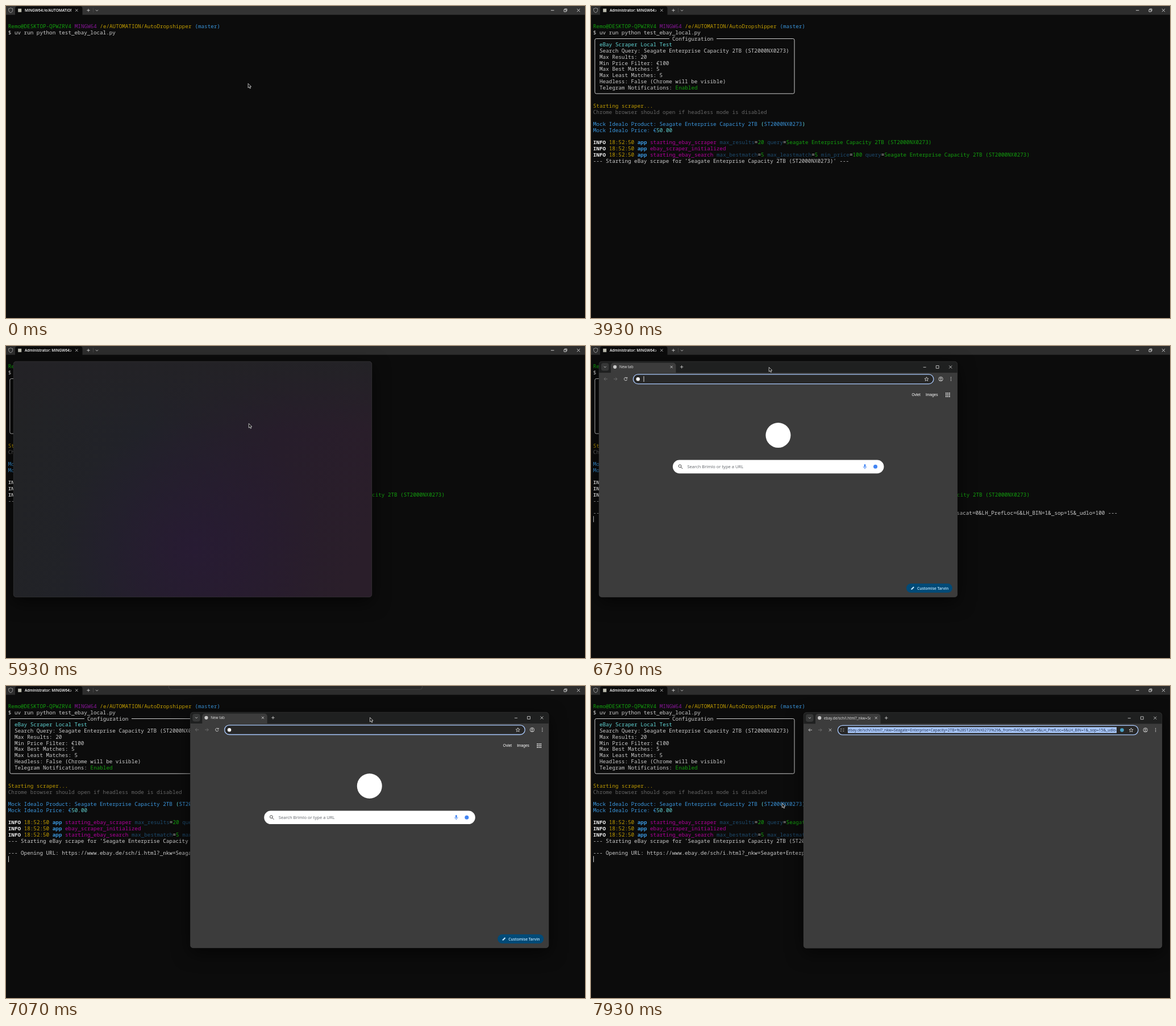
Animation of 1019x549 px, one loop 8 s. Source, as an HTML page with a canvas:

```html
<!DOCTYPE html>
<html lang="en">
<head>
<meta charset="utf-8">
<title>Terminal session</title>
<style>
html, body { margin: 0; width: 100%; height: 100%; overflow: hidden; background: #0c0c0c; }
canvas { display: block; }
</style>
</head>
<body>
<canvas id="stage" width="1019" height="549"></canvas>
<script>
const ctx = document.getElementById('stage').getContext('2d');
const LOOP = 8000, COL = 5.57, ROW = 10.75, LEFT = 3.8;
const UI = '"Open Sans", "Noto Sans", sans-serif';
const MONO = '"Noto Sans Mono", "DejaVu Sans Mono", monospace';

const C = {
  green: '#13a10e', purple: '#881798', pink: '#b4009e', yellow: '#c19c00', blue: '#3a96dd',
  cyan: '#61d6d6', white: '#cccccc', bright: '#f2f2f2', gray: '#666666', dim: '#1d4b6e'
};
const DISK = 'Seagate Enterprise Capacity 2TB (ST2000NX0273)';
const URL_TEXT = 'ebay.de/sch/i.html?_nkw=Seagate+Enterprise+Capacity+2TB+%28ST2000NX0273%29' +
  '&_from=R40&_sacat=0&LH_PrefLoc=6&LH_BIN=1&_sop=15&_udlo=100';

// Drawing helpers
function stroke(d, color, width = 0.8) {
  ctx.strokeStyle = color;
  ctx.lineWidth = width;
  ctx.stroke(new Path2D(d));
}
function fill(d, color) {
  ctx.fillStyle = color;
  ctx.fill(new Path2D(d));
}
function box(x, y, w, h, r, color, border, width = 0.8) {
  ctx.beginPath();
  ctx.roundRect(x, y, w, h, r);
  if (color) { ctx.fillStyle = color; ctx.fill(); }
  if (border) { ctx.strokeStyle = border; ctx.lineWidth = width; ctx.stroke(); }
}
function dot(x, y, r, color) {
  box(x - r, y - r, 2 * r, 2 * r, r, color);
}
function label(text, x, y, size, color, weight = 400, family = UI) {
  ctx.font = `${weight} ${size}px ${family}`;
  ctx.fillStyle = color;
  ctx.fillText(text, x, y);
}
function clipped(x, y, w, h, r, draw) {
  ctx.save();
  ctx.beginPath();
  ctx.roundRect(x, y, w, h, r);
  ctx.clip();
  draw();
  ctx.restore();
}
const cross = (x, y, r, color) =>
  stroke(`M${x - r} ${y - r}l${2 * r} ${2 * r}m0 ${-2 * r}l${-2 * r} ${2 * r}`, color);
const plus = (x, y, r, color) =>
  stroke(`M${x - r} ${y}h${2 * r}M${x} ${y - r}v${2 * r}`, color);
const chevron = (x, y, color) => stroke(`M${x - 2} ${y - 1}l2 2 2-2`, color);

const clamp = (v) => Math.max(0, Math.min(1, v));
const easeOut = (u) => 1 - (1 - clamp(u)) ** 3;
function track(t, keys) {
  let i = 1;
  while (i < keys.length - 1 && t > keys[i][0]) i++;
  const [a, b] = [keys[i - 1], keys[i]];
  const u = clamp((t - a[0]) / (b[0] - a[0]));
  return [a[1] + (b[1] - a[1]) * u, a[2] + (b[2] - a[2]) * u];
}

// Terminal text: runs are "colour text" pairs, a trailing ! on the colour means bold
function line(row, col, ...runs) {
  for (let i = 0; i < runs.length; i += 2) {
    const bold = runs[i].endsWith('!');
    label(runs[i + 1], LEFT + col * COL, 39.2 + row * ROW, COL / 0.6,
      C[runs[i].replace('!', '')], bold ? 700 : 500, MONO);
    col += runs[i + 1].length;
  }
}
function log(row, event, ...pairs) {
  const runs = ['bright!', 'INFO ', 'yellow', '18:52:50 ', 'blue!', 'app ', 'pink', event + ' '];
  for (let i = 0; i < pairs.length; i += 2)
    runs.push('dim', pairs[i], 'white', '=', 'green', pairs[i + 1] + ' ');
  line(row, 0, ...runs);
}

function titleBar(t) {
  ctx.fillStyle = t < 1800 ? '#333333' : '#2d2d2d';
  ctx.fillRect(0, 0, 1019, 15.5);
  box(16, 0.5, 118.5, 18, 4, '#0c0c0c');
  stroke('M8.2 3.4q1.7 1.2 3.5 1.2v3q0 2.8-3.5 4.2-3.5-1.4-3.5-4.2v-3q1.8 0 3.5-1.2z', '#aaa');
  box(21.2, 4.7, 6, 6, 0, '#bdbdb0');
  clipped(32, 0, 83, 15, 0, () =>
    label(t < 3070 ? 'MINGW64:/e/AUTOMATION/AutoDropshipper' : 'Administrator: MINGW64:/e/AUTOMATION',
      33, 10.1, 6.5, '#fff', 600));
  cross(124.3, 7.6, 2.2, '#ddd');
  plus(145, 7.6, 2.7, '#ddd');
  stroke('M153.5 3.5v8', '#4a4a4a');
  chevron(160, 7.8, '#ddd');
  stroke('M959 7.7h5.5', '#eee');
  stroke('M982 6.2h3.8v3.8h-3.8zM983.3 6v-1h3.8v3.8h-1', '#eee');
  cross(1007.5, 7.6, 2.6, '#eee');
}

function terminal(t) {
  line(0, 0, 'green', 'Remo@DESKTOP-QPWZRV4 ', 'purple', 'MINGW64 ',
    'yellow', '/e/AUTOMATION/AutoDropshipper ', 'blue', '(master)');
  line(1, 0, 'white', '$ uv run python test_ebay_local.py');
  if (t >= 2870) {
    stroke('M138 57.5H9.3q-2.5 0-2.5 2.5v91.7q0 2.5 2.5 2.5H355.5q2.5 0 2.5-2.5V60q0-2.5-2.5-2.5H221',
      C.white, 1);
    line(2, 25, 'white', 'Configuration');
    line(3, 2, 'cyan', 'eBay Scraper Local Test');
    ['Search Query: ' + DISK, 'Max Results: 20', 'Min Price Filter: €100', 'Max Best Matches: 5',
      'Max Least Matches: 5', 'Headless: False (Chrome will be visible)'
    ].forEach((text, i) => line(4 + i, 2, 'white', text));
    line(10, 2, 'white', 'Telegram Notifications: ', 'green', 'Enabled');
    line(13, 0, 'yellow', 'Starting scraper...');
    line(14, 0, 'gray', 'Chrome browser should open if headless mode is disabled');
    line(16, 0, 'blue', 'Mock Idealo Product: Seagate Enterprise Capacity 2TB ',
      'cyan', '(', 'blue', 'ST2000NX0273', 'cyan', ')');
    line(17, 0, 'blue', 'Mock Idealo Price: €', 'cyan', '50.00');
    log(19, 'starting_ebay_scraper', 'max_results', '20', 'query', DISK);
    log(20, 'ebay_scraper_initialized');
    log(21, 'starting_ebay_search', 'max_bestmatch', '5', 'max_leastmatch', '5',
      'min_price', '100', 'query', DISK);
    line(22, 0, 'white', `--- Starting eBay scrape for '${DISK}' ---`);
  }
  if (t >= 6330) line(24, 0, 'white', `--- Opening URL: https://www.${URL_TEXT} ---`);

  const toggles = [930, 1530, 1800, 2270, 2670, 3070, 3470, 3930, 4330, 4730, 5130, 5530, 5960];
  if (toggles.filter((at) => t >= at).length % 2) {
    const row = t < 1800 ? 1 : t < 2870 ? 2 : t < 6330 ? 23 : 25;
    ctx.fillStyle = C.white;
    ctx.fillRect(row === 1 ? 199 : 4, 30.5 + row * ROW, 1, 10.7);
  }
}

// Browser window, drawn at its opening position
function emptyPane() {
  const side = ctx.createLinearGradient(13, 120, 644, 300);
  side.addColorStop(0, '#222325');
  side.addColorStop(0.35, '#212229');
  side.addColorStop(0.7, '#271d2b');
  side.addColorStop(1, '#2a1e2a');
  ctx.fillStyle = side;
  ctx.fillRect(13, 27, 631, 415);
  const glow = ctx.createRadialGradient(330, 360, 0, 330, 360, 230);
  glow.addColorStop(0, '#281a35cc');
  glow.addColorStop(1, '#281a3500');
  ctx.fillStyle = glow;
  ctx.fillRect(13, 27, 631, 415);
  const top = ctx.createLinearGradient(0, 27, 0, 150);
  top.addColorStop(0, '#232226');
  top.addColorStop(1, '#23222600');
  ctx.fillStyle = top;
  ctx.fillRect(13, 27, 631, 123);
}

function startPage() {
  label('Ovlet', 563.5, 88.4, 6.6, '#fff', 400, '"Liberation Sans", Arial, sans-serif');
  label('Images', 588, 88.4, 6.6, '#fff', 400, '"Liberation Sans", Arial, sans-serif');
  for (let i = 0; i < 9; i++) dot(624 + (i % 3) * 3, 83 + Math.floor(i / 3) * 3, 1, '#fff');
  dot(328.5, 157, 22, '#fff');
  box(143, 200.5, 371.5, 23.6, 11.8, '#fff');
  stroke('M158 211.2a2.4 2.4 0 1 1-4.8 0a2.4 2.4 0 1 1 4.8 0M157.3 213l3 3', '#444', 1);
  label('Search Brimlo or type a URL', 168.5, 215.3, 7.6, '#5f6368');
  box(479.8, 208, 2.6, 5.2, 1.3, '#4285f4');
  stroke('M478.3 211.8q0 2.8 2.8 2.8t2.8-2.8M481.1 214.6v2', '#4285f4');
  dot(499.6, 212.3, 3.5, '#4285f4');
  box(554, 418, 81, 16, 8, '#004a77');
  fill('M562.5 428.7v-1.5l4-4 1.5 1.5-4 4z', '#c2e7ff');
  label('Customise Tarvin', 573, 428.6, 6.7, '#c2e7ff', 600);
}

function browserChrome(t, loading) {
  ctx.fillStyle = '#1f2020';
  ctx.fillRect(13, 27, 631, 20.5);
  box(17, 30, 13.5, 13.5, 4, '#363737');
  chevron(23.8, 36.8, '#ddd');
  box(34, 29.5, 114.5, 22, 5, '#3c3c3c');
  ctx.fillStyle = '#3c3c3c';
  ctx.fillRect(13, 47, 631, 395);
  dot(41.2, 36.8, 3.1, '#c8c8c8');
  clipped(48, 30, 83, 14, 0, () =>
    label(loading ? URL_TEXT : 'New tab', 49, 39.2, 6.4, '#e3e3e3'));
  cross(140.7, 36.8, 2, '#ddd');
  plus(158.7, 36.8, 2.7, '#ddd');
  stroke('M583.8 37.3h5', '#ddd');
  stroke('M606.4 34.5h4.8v4.8h-4.8z', '#ddd');
  cross(631.8, 36.9, 2.5, '#ddd');

  stroke('M28 58h-6m2.7-2.7l-2.7 2.7 2.7 2.7', loading ? '#ddd' : '#777');
  stroke('M39 58h6m-2.7-2.7l2.7 2.7-2.7 2.7', '#777');
  if (loading) cross(60, 58, 2.3, '#ddd');
  else stroke('M62.3 56.4a2.7 2.7 0 1 0 .4 2.4M62.8 54.8v2h-2.2', '#ddd', 0.9);

  box(73.4, 49.9, 528.6, 16.6, 8.3, '#282828', '#a8c7fa', 1.3);
  if (loading) {
    stroke('M78 56.3h2.5M82.5 56.3h2M78 59.8h2M82 59.8h2.5', '#ddd');
    ctx.fillStyle = '#a8c7fa';
    ctx.fillRect(91, 53, 473, 10.3);
    clipped(91, 50, 472.5, 16, 0, () => label(URL_TEXT, 91.4, 60.7, 6.72, '#1b2740'));
    dot(573.5, 58.2, 3.3, '#4aa3c7');
  } else {
    dot(81.8, 58.2, 3.2, '#fff');
    if (t < 7030) {
      ctx.fillStyle = '#eee';
      ctx.fillRect(91.6, 53, 0.9, 10);
    }
  }
  stroke('M589.6 54.6l1 2.4 2.5.2-1.9 1.7.6 2.5-2.2-1.4-2.2 1.4.6-2.5-1.9-1.7 2.5-.2z', '#ddd');
  stroke('M618.4 58a3.7 3.7 0 1 1-7.4 0a3.7 3.7 0 1 1 7.4 0M616 57a1.3 1.3 0 1 1-2.6 0' +
    'a1.3 1.3 0 1 1 2.6 0M612.3 60.8q2.4-1.8 4.8 0', '#ddd');
  for (const y of [55.3, 58, 60.7]) dot(632.6, y, 0.75, '#ddd');
}

function browser(t) {
  if (t < 5670) return;
  const open = easeOut((t - 5640) / 230);
  const [dx, dy] = track(t, [[6730, 0, 0], [7070, 311, 19], [7260, 361, 19.4]]);
  const scale = 0.9 + 0.1 * open;
  ctx.save();
  ctx.translate(328.5 + dx, 234.5 + dy);
  ctx.scale(scale, scale);
  ctx.translate(-328.5, -234.5);
  ctx.globalAlpha = open;
  ctx.save();
  ctx.shadowColor = 'rgba(0,0,0,.6)';
  ctx.shadowBlur = 30;
  ctx.shadowOffsetY = 9;
  box(13, 27, 631, 415, 5, '#222');
  ctx.restore();
  clipped(13, 27, 631, 415, 5, () => {
    if (t < 6070) return emptyPane();
    const loading = t >= 7600;
    browserChrome(t, loading);
    if (t >= 6270 && !loading) startPage();
  });
  box(13.2, 27.2, 630.6, 414.6, 5, null, '#3d3d3d', 0.5);
  ctx.restore();
}

function snapBar(t) {
  const shown = clamp((t - 6850) / 130) * clamp((7460 - t) / 130);
  if (shown) box(286.5, -10 + 5.5 * (shown - 1), 446, 16, 4, '#2a2a2a', '#484848');
}

function pointer(t) {
  if (t >= 1800 && t < 5670) return;
  const [x, y] = track(t, [[930, 425.8, 136], [1130, 427, 136], [6350, 427, 136], [6650, 312, 37],
    [6730, 312, 37], [7070, 640, 55], [7260, 690, 56], [7400, 690, 56], [7900, 336, 206]]);
  ctx.save();
  ctx.translate(x, y);
  const arrow = 'M.3.4v7.6l1.8-1.6 1.3 2.8 1.3-.6-1.2-2.7h2.3z';
  fill(arrow, '#0c0c0c');
  stroke(arrow, '#e8e8e8', 0.8);
  ctx.restore();
}

function frame() {
  const t = performance.now() % LOOP;
  ctx.fillStyle = '#0c0c0c';
  ctx.fillRect(0, 0, 1019, 549);
  titleBar(t);
  terminal(t);
  browser(t);
  snapBar(t);
  pointer(t);
  requestAnimationFrame(frame);
}
frame();
</script>
</body>
</html>
```
